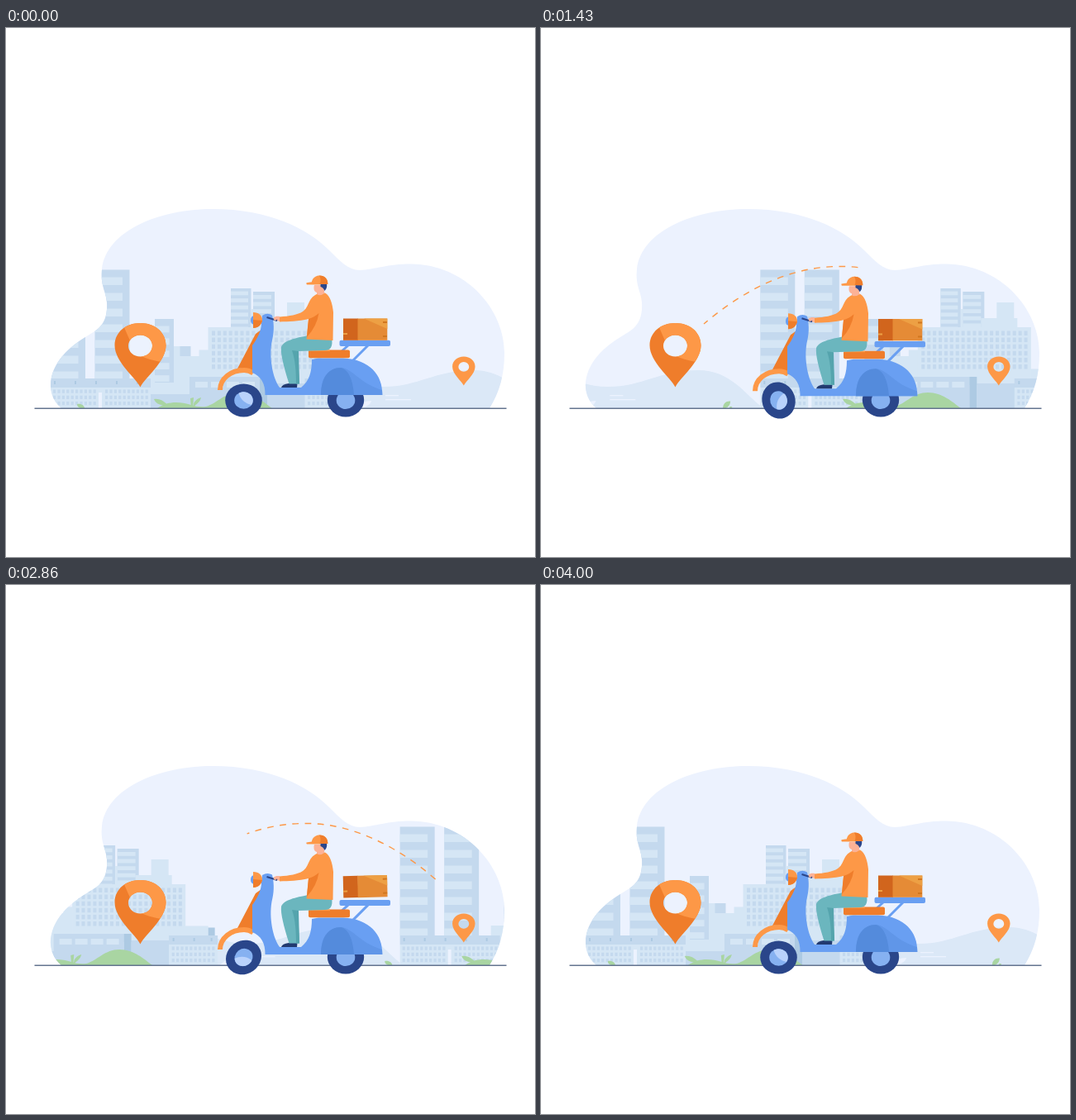
Recreate the animation shown at these times as an HTML page with a canvas. Size 640x640 px, loop 4.07 s.

```html
<!DOCTYPE html>
<html lang="en">
<head>
<meta charset="utf-8">
<title>Scooter delivery</title>
<style>
  html, body { margin: 0; width: 100%; height: 100%; overflow: hidden; background: #fff; }
  canvas { display: block; width: 640px; height: 640px; }
</style>
</head>
<body>
<canvas id="stage" width="640" height="640"></canvas>
<script>
const ctx = document.getElementById('stage').getContext('2d');

const LOOP = 4070, CITY_WIDTH = 587, PLANT_WIDTH = 517;
const SKY = '#ecf2fe', HILL = '#dbe8f7', PALE = '#d5e6f5', WALL = '#c4d9ee', DEEP = '#adcae3';
const ORANGE = '#fd9847', RUST = '#ef7d2b', BLUE = '#699ff2', NAVY = '#2a468a';
const GREEN = '#a9d5a2', TEAL = '#6bb6be', SKIN = '#fcb296';

const BLOB = new Path2D('M67 460C57 452 53 440 54 428C58 400 80 383 104 369C118 361 123 350 122 332C121 318 114 312 116 292C121 246 184 219 250 219C320 219 366 244 390 268C404 282 414 293 428 293C446 292 462 285.5 490 285.5C556 286 603 340 603 393C603 420 597 440 585 460Z');
const PIN = new Path2D('M162.5 434.5C157 423 131.5 404 131.5 384C131.5 368 145 357 162.5 357C180 357 193.5 368 193.5 384C193.5 404 168 423 162.5 434.5ZM177 384.5A14.5 13 0 1 0 148 384.5A14.5 13 0 1 0 177 384.5Z');
const ROUTE = new Path2D('M550 387C506 335 434 289 366 288.5C300 287 243 319 197 358');
const ROUTE_LENGTH = 402;

function shape(d, color) {
  ctx.fillStyle = color;
  ctx.fill(new Path2D(d));
}

function line(d, color, width) {
  ctx.strokeStyle = color;
  ctx.lineWidth = width;
  ctx.stroke(new Path2D(d));
}

function box(x1, y1, x2, y2, color) {
  ctx.fillStyle = color;
  ctx.fillRect(x1, y1, x2 - x1, y2 - y1);
}

function oval(x, y, rx, ry, color, angle = 0) {
  ctx.fillStyle = color;
  ctx.beginPath();
  ctx.ellipse(x, y, rx, ry, angle, 0, Math.PI * 2);
  ctx.fill();
}

function pill(x, y, w, h, r, color) {
  ctx.fillStyle = color;
  ctx.beginPath();
  ctx.roundRect(x, y, w, h, r);
  ctx.fill();
}

function at(x, y, draw) {
  ctx.save();
  ctx.translate(x, y);
  draw();
  ctx.restore();
}

function stripes(x1, x2, y, step, height, bottom) {
  for (; y < bottom; y += step) box(x1, y, x2, Math.min(y + height, bottom), PALE);
}

function windows(x, y, cols, rows, dx, dy, w, h) {
  for (let c = 0; c < cols; c++)
    for (let r = 0; r < rows; r++)
      box(x + c * dx, y + r * dy, x + c * dx + w, y + r * dy + h, WALL);
}

function lowBlock(x1, x2, lamps) {
  box(x1, 424, x2, 435, WALL);
  box(x1, 435, x2, 460, PALE);
  lamps.forEach(x => box(x - 1, 427, x + 1, 431, DEEP));
}

function city() {
  shape('M360 460V426C374 430 386 434 402 434C446 434 464 414 512 414C550 414 568 442 587 457V460Z', HILL);
  box(405, 444, 421, 445.3, SKY);
  box(405, 449, 436, 450.3, SKY);
  shape('M369 460C375 454 381 451 388 451C387 456 381 459 374 460Z', SKY);

  // twin towers
  for (const x of [0, 53.5]) {
    box(x, 292.5, x + 42, 424, WALL);
    stripes(x, x + 33.5, 301.5, 19, 9.5, 424);
  }

  // striped tower with stepped neighbours
  box(110, 412, 127, 445, PALE);
  box(126, 352, 149, 430, WALL);
  stripes(126, 143.5, 360.5, 14.9, 7.8, 429);
  box(149, 385, 157, 445, PALE);
  box(126, 429, 149, 445, PALE);
  box(156.5, 397, 191, 445, PALE);
  box(156.5, 385, 169.5, 397, WALL);
  box(179.5, 389.5, 191, 400, PALE);
  box(119, 443, 170, 460, WALL);

  // office block
  box(218, 315, 242.5, 362, WALL);
  stripes(218, 239, 318.5, 8.6, 4.8, 362);
  box(242.5, 340, 245, 362, PALE);
  box(245, 319, 271, 362, WALL);
  stripes(245, 267, 323, 8.6, 4.8, 362);
  box(286, 332, 307, 352, PALE);
  box(267, 351, 311, 363, PALE);
  box(190.5, 362, 327.5, 432, PALE);
  windows(195, 366.5, 19, 6, 6.9, 8.1, 4, 5.5);

  // shop front
  box(168, 422, 253, 460, WALL);
  for (let x = 175; x < 240; x += 19) box(x, 428, x + 15, 435, PALE);
  box(262, 430, 308, 460, WALL);
  box(253, 422, 262, 460, DEEP);

  box(327, 412.5, 355, 425, PALE);
  box(355, 414.5, 363, 425, DEEP);
  lowBlock(307.5, 366.5, [313, 338, 359]);
  windows(311, 437.5, 10, 3, 5.4, 7.2, 3.2, 4.2);

  lowBlock(0, 121, [5, 30, 55, 80, 105]);
  for (const x of [3, 66]) windows(x, 437.5, 10, 3, 5.4, 7.2, 3.2, 4.2);
  box(58, 441, 62, 460, SKY);
}

function plants() {
  shape('M-4 460C-4 454 0 451 5 451.5C5 456 2 459 -1 460Z', GREEN);
  oval(5.5, 459, 1.8, 1, GREEN);
  shape('M48 455C53 454 57 457 57 460H52C49 459 48 457 48 455Z', GREEN);
  shape('M145 460C158 451 172 452 186 456Q194 459 204 458C218 454 226 441 244 441C262 441 274 453 284 460Z', GREEN);
  shape('M141 449C149 448 155 453 158 457C150 457 143 455 141 449Z', GREEN);
  shape('M185 448L189 447L188 460H186Z', GREEN);
  shape('M198 447C197 453 191 456 189 458C188 453 192 449 198 447Z', GREEN);
}

function repeat(x, width, draw) {
  at(x, 0, draw);
  at(x - width, 0, draw);
}

function pins() {
  ctx.save();
  ctx.fillStyle = RUST;
  ctx.fill(PIN, 'evenodd');
  ctx.clip(PIN, 'evenodd');
  shape('M142 360L156 392Q165 400 188 404L200 400V350H142Z', ORANGE);
  ctx.restore();

  at(553.8, 397.5, () => {
    ctx.scale(0.444, 0.452);
    ctx.translate(-162.5, -357);
    ctx.fillStyle = ORANGE;
    ctx.fill(PIN, 'evenodd');
  });
}

function route(age) {
  const head = Math.min(ROUTE_LENGTH, 12.1 * age);
  const tail = Math.max(0, 12.8 * (age - 20.6));
  if (age <= 0 || tail >= ROUTE_LENGTH) return;
  const dashes = [0, tail];
  for (let s = tail; s < head; s += 15.25) dashes.push(Math.min(7.75, head - s), 7.5);
  dashes.push(0, 999);
  ctx.save();
  ctx.setLineDash(dashes);
  ctx.strokeStyle = ORANGE;
  ctx.lineWidth = 1.4;
  ctx.stroke(ROUTE);
  ctx.restore();
}

function frontWheel(angle) {
  at(287.5, 450.5, () => {
    ctx.rotate(angle);
    oval(0, 0, 22.3, 20, NAVY);
    oval(0, 0, 11.3, 10.3, '#86b1f1');
    shape('M-6 -8.7C-2 -11 4 -11 8 -7.2C12 -3 12 2 9.5 5.4C2 4 -4 -1 -6 -8.7Z', '#b9d2fc');
  });
}

function rearWheel() {
  oval(411, 450, 22.2, 20.5, NAVY);
  oval(411, 450.5, 11.3, 10.5, '#86b1f1');
}

function scooter() {
  shape('M309 365L302 370L280 412Q290 411 298 417L304 400Z', RUST);
  line('M259 438C259 424 272 414 288 414Q294 414 299 417.5', ORANGE, 6);
  shape('M310 348Q316 344 322 347.5C325 360 324 370 321.5 380C318 400 323 424 331 435H357C367 427 370 416 370 401L378 399.5H408C440 401 456 420 455.3 444H313.5C314 430 308 421 298 417V384C304 376 309 366 309 357Z', BLUE);
  shape('M381 444C381 423 390 411 405 411C420 412 426 429 455 438L455.3 444Z', '#6096e8');
  shape('M381 444C381 423 390 411 405 411C415 413 420 428 421 444Z', '#548bdc');

  oval(299, 353.5, 3, 5, BLUE);
  shape('M299 344C306 344 310 348 310 353.5C309 359 305 363 299 363Z', ORANGE);
  shape('M299 353L310 354C309 359 305 363 299 363Z', RUST);

  line('M414 384L404 393M438 384L420 402', BLUE, 3);
  pill(403.5, 377.8, 61.5, 7.2, 2, BLUE);
  pill(366, 389.5, 50, 9.7, 2, RUST);
  box(367, 389.5, 392, 391, ORANGE);
}

function rider() {
  shape('M333 435Q334 431 342 430H352.5L352 435Z', '#223a70');
  shape('M394 375C396 386 392 390 386 390L353 391L355 430.5H342.5C336 410 332 394 333 386C336 378 350 375 366 372Z', TEAL);
  shape('M346 390L354 391L355 430.5H351C351 415 350 402 346 390Z', '#55a4ad');

  shape('M373 311H385V318L386 325Q380 328 376 324V320Q372 319 372.5 313Z', SKIN);
  shape('M380.5 309H388Q389 315 385.5 318Q384 314 380.5 313Z', NAVY);
  shape('M363.5 308.3Q372 306.5 380 308V310.5H364Q363 309.5 363.5 308.3Z', ORANGE);
  shape('M369.5 309.5C370 302 375 299.5 379.5 299.5C386 299.5 389.5 304 389.3 310Z', ORANGE);
  shape('M379 299.5C386 299.5 389.5 304 389.3 310H379.5C381 306 381 303 379 299.5Z', RUST);

  shape('M331 349C325 348 322 351 324 353.5L332 355Z', SKIN);
  shape('M376 322Q380 325 386 320.5C392 324 395 333 396 344L395.5 378L363.5 376.5L366 352C354 355 342 355 331 355.5V349.5C343 348.5 353 347 359 343C367 338 365 327 376 322Z', ORANGE);
  shape('M366 352Q373 350 378.5 345Q376 361 364 374Z', RUST);
  line('M315.5 350L328 354', NAVY, 2);
  line('M324 352.2L327 352.5', SKIN, 2.4);
}

function parcel(bob) {
  const tilt = Math.max(0, 2 * bob - 1);
  at(434.5, 365 + 1.4 * Math.min(bob, 1 - bob), () => {
    ctx.rotate(-0.028 * tilt);
    ctx.translate(-434.5, -365);
    box(408, 351.5, 426, 377.8, '#d1651d');
    box(425.5, 351.5, 461.3, 377.8, '#e58b36');
    shape('M433 351.5H461.3V364Z', '#eda044');
    box(408, 369, 413, 371, '#eda044');
    box(456, 355, 461, 357, '#d1771f');
    box(456, 372, 461, 374, '#d1771f');
  });
}

function draw(frame) {
  const bob = (1 - Math.cos(frame * Math.PI / 10)) / 2;
  ctx.fillStyle = '#fff';
  ctx.fillRect(0, 0, 640, 640);

  ctx.save();
  ctx.fillStyle = SKY;
  ctx.fill(BLOB);
  ctx.clip(BLOB);
  repeat(54 + CITY_WIDTH * frame / 100, CITY_WIDTH, city);
  repeat(38 + PLANT_WIDTH * Math.min(frame, 99) / 100, PLANT_WIDTH, plants);
  ctx.restore();

  line('M34.5 460.2H605.5', '#64748f', 1.4);
  pins();
  route(frame);
  route(frame - 48);

  rearWheel();
  at(0, 3.4 * bob, scooter);
  frontWheel(-frame * Math.PI / 10);
  at(0, 3.4 * bob, rider);
  parcel(bob);
}

// 14 pictures a second, each showing the next step of a 25-per-second motion
function tick(now) {
  const picture = Math.min(56, Math.floor((now % LOOP + 4.9) * 0.014));
  draw(Math.ceil(picture * 25 / 14));
  requestAnimationFrame(tick);
}

draw(0);
requestAnimationFrame(tick);
</script>
</body>
</html>
```
